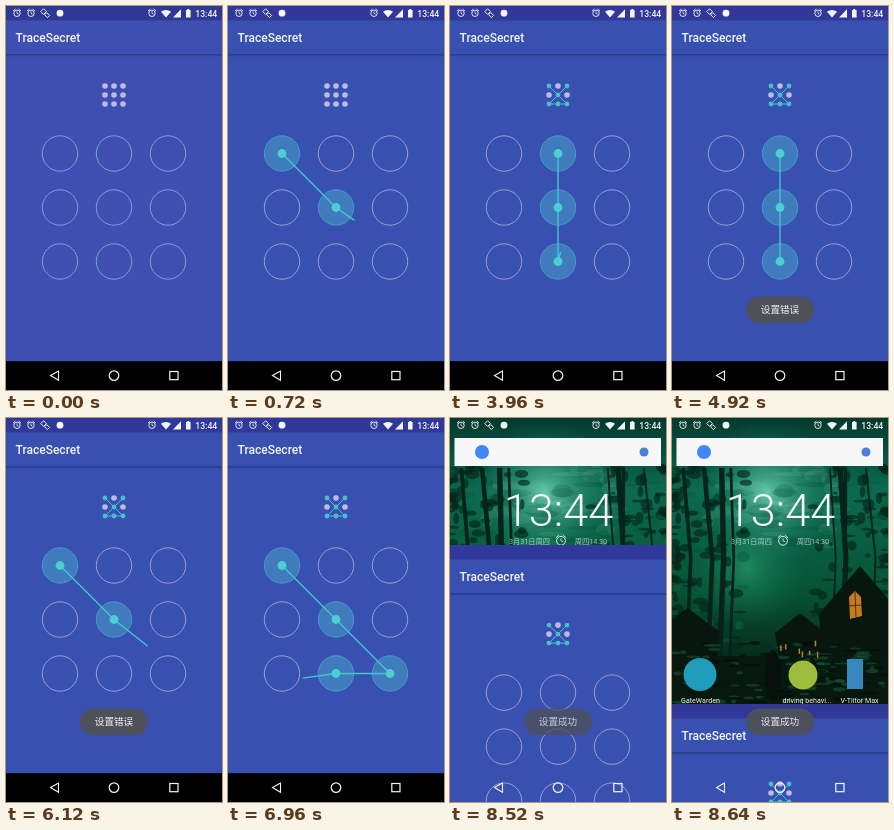
Animation of 216x384 px, one loop 8760 ms. Source, as an HTML page with a canvas:

```html
<!DOCTYPE html>
<html lang="zh">
<head>
<meta charset="utf-8">
<title>TraceSecret</title>
<style>
html, body { margin: 0; width: 100%; height: 100%; overflow: hidden; background: #3850b0; }
canvas { display: block; width: 100vw; height: 100vh; }
</style>
</head>
<body>
<canvas id="stage"></canvas>
<script>
const W = 216, H = 384, LOOP = 8760, STEP = 120;
const NAV_TOP = 355.2, NAV_MID = 369.6, LEAVE = 8280, APP_DROP = 286;
const canvas = document.getElementById('stage');
const ctx = canvas.getContext('2d');
const SANS = 'Roboto, "Noto Sans CJK SC", "Noto Sans CJK", sans-serif';
const TEAL = '#4ccfd3', WHITE = '#f4f4f8';
const SECRET = [0, 4, 8, 7, 6, 4, 2];

// The finger crosses one cell every "pace" ms; the drawing stays until "clear".
const strokes = [
  { route: SECRET, start: 194, pace: 408, clear: 3400 },
  { route: [1, 4, 7], start: 3478, pace: 264, clear: 5160 },
  { route: SECRET, start: 5485, pace: 408, clear: LEAVE }
];

const clamp = v => Math.max(0, Math.min(1, v));
const gridPoint = (i, x, y, gap) => [x + i % 3 * gap, y + Math.floor(i / 3) * gap];
const node = i => gridPoint(i, 54, 147.5, 54);
const mini = i => gridPoint(i, 99, 80, 9);

function seeded(seed) {
  return () => (seed = seed * 16807 % 2147483647) / 2147483647;
}

function disc(x, y, r, fill, stroke, width = 1) {
  ctx.beginPath();
  ctx.arc(x, y, r, 0, Math.PI * 2);
  if (fill) { ctx.fillStyle = fill; ctx.fill(); }
  if (stroke) { ctx.strokeStyle = stroke; ctx.lineWidth = width; ctx.stroke(); }
}

function oval(x, y, rx, ry, fill) {
  ctx.beginPath();
  ctx.ellipse(x, y, rx, ry, 0, 0, Math.PI * 2);
  ctx.fillStyle = fill;
  ctx.fill();
}

function rect(x, y, w, h, fill) {
  ctx.fillStyle = fill;
  ctx.fillRect(x, y, w, h);
}

function line(points, color, width) {
  ctx.beginPath();
  points.forEach(p => ctx.lineTo(...p));
  ctx.strokeStyle = color;
  ctx.lineWidth = width;
  ctx.stroke();
}

function poly(points, fill) {
  ctx.beginPath();
  points.forEach(p => ctx.lineTo(...p));
  ctx.fillStyle = fill;
  ctx.fill();
}

function text(str, x, y, font, align = 'left', fill = WHITE) {
  ctx.font = font + ' ' + SANS;
  ctx.textAlign = align;
  ctx.fillStyle = fill;
  ctx.fillText(str, x, y);
}

// Point on the route after "cells" cells, bowed a little to one side.
function fingerAt(route, cells) {
  const k = Math.floor(cells), u = cells - k;
  const [x0, y0] = node(route[k]), [x1, y1] = node(route[k + 1]);
  const dx = x1 - x0, dy = y1 - y0;
  const bow = 5 * Math.sin(Math.PI * u) / Math.hypot(dx, dy);
  return [x0 + dx * u + dy * bow, y0 + dy * u - dx * bow];
}

function alarm(x, y, r = 3.2) {
  disc(x, y + 0.3, r, null, WHITE, 0.9);
  line([[x, y - r / 2], [x, y + 0.4], [x + r / 2, y + 1.2]], WHITE, 0.8);
  for (const s of [-1, 1]) {
    line([[x + s * (r + 0.8), y - r * 0.6], [x + s * r / 2, y - r - 0.8]], WHITE, 0.9);
  }
}

function statusIcons() {
  [11, 25, 146].forEach(x => alarm(x, 7));
  ctx.save();
  ctx.translate(39, 7);
  ctx.rotate(Math.PI / 4);
  ctx.strokeStyle = WHITE;
  ctx.strokeRect(-4, -2, 4, 4);
  ctx.strokeRect(1, -1.5, 4, 3);
  ctx.restore();
  disc(54, 7.2, 3.4, WHITE);
  ctx.beginPath();
  ctx.moveTo(160, 11.5);
  ctx.arc(160, 11.5, 7.6, Math.PI * 1.27, Math.PI * 1.73);
  ctx.fillStyle = WHITE;
  ctx.fill();
  poly([[167, 11.5], [175, 3.2], [175, 11.5]], WHITE);
  rect(180, 4, 4.6, 7.5, WHITE);
  rect(181.3, 3, 2, 1, WHITE);
  text('13:44', 211.3, 10.6, '500 8.7px', 'right');
}

function navIcons() {
  line([[52.5, 365], [44.5, NAV_MID], [52.5, 374.2], [52.5, 364.5]], WHITE, 1.1);
  disc(108, NAV_MID, 4.8, null, WHITE, 1.2);
  ctx.strokeRect(163.8, NAV_MID - 4.1, 8.2, 8.2);
}

function indicator(done) {
  if (done) line(SECRET.map(mini), TEAL, 0.9);
  for (let i = 0; i < 9; i++) {
    const on = done && SECRET.includes(i);
    disc(...mini(i), on ? 2.4 : 2.8, on ? '#49bfca' : '#bdbbe4');
  }
}

function grid(t) {
  const stroke = strokes.find(s => t >= s.start && t < s.clear);
  const { route, start, pace } = stroke || { route: [], start: 0, pace: 1 };
  const cells = (t - start) / pace;
  const hits = route.filter((n, i) => cells >= i - 0.2);
  for (let i = 0; i < 9; i++) {
    const on = hits.includes(i);
    disc(...node(i), 17.7, on ? '#407bbd' : null,
      on ? '#4b9fc8' : t < STEP ? '#7babdd' : '#aaa2dc', 0.9);
  }
  const trail = hits.map(node);
  if (cells < route.length - 1) trail.push(fingerAt(route, cells));
  line(trail, '#42c6cf', 1.4);
  hits.forEach(i => disc(...node(i), 4.4, TEAL));
}

function app(t, shift) {
  ctx.save();
  ctx.translate(0, shift);
  rect(0, 0, W, H, t < STEP ? '#3f4fb1' : '#3850b0');
  rect(0, 0, W, 14.4, t < STEP ? '#2d3995' : '#30399a');
  const shade = ctx.createLinearGradient(0, 48, 0, 51);
  shade.addColorStop(0, 'rgba(20,30,80,.45)');
  shade.addColorStop(1, 'rgba(20,30,80,0)');
  rect(0, 48, W, 3, shade);
  text('TraceSecret', 9.5, 35.8, '500 12px');
  indicator(t >= 3000);
  grid(t);
  ctx.restore();
}

function glow(x, y, r, color) {
  const g = ctx.createRadialGradient(x, y, 0, x, y, r);
  g.addColorStop(0, color);
  g.addColorStop(1, 'rgba(10,110,80,0)');
  rect(0, 0, W, H, g);
}

function house(x, y, w, h) {
  poly([[x - 5, y + h * 0.4], [x + w / 2, y], [x + w + 5, y + h * 0.4],
    [x + w, y + h], [x, y + h]], '#07160f');
}

function wallpaper() {
  const rnd = seeded(31);
  const sky = ctx.createLinearGradient(0, 0, 0, 290);
  sky.addColorStop(0, '#04392f');
  sky.addColorStop(0.25, '#0b6a50');
  sky.addColorStop(0.6, '#075236');
  sky.addColorStop(0.85, '#06271a');
  rect(0, 0, W, H, sky);
  glow(95, 75, 75, 'rgba(110,215,180,.85)');
  glow(75, 150, 60, 'rgba(40,155,110,.7)');
  // drifting cloud wisps
  for (let i = 0; i < 40; i++) {
    oval(30 + rnd() * 140, 45 + rnd() * 90, 6 + rnd() * 16, 2 + rnd() * 6,
      i % 2 ? 'rgba(130,220,190,.13)' : 'rgba(4,70,52,.2)');
  }
  // leaves crowd towards both edges and thin out over the middle
  for (let i = 0; i < 260; i++) {
    const inset = 75 * rnd() ** 2, y = 50 + rnd() * 180;
    oval(i % 2 ? inset : W - inset, y, 2 + rnd() * 6, 1 + rnd() * 5,
      rnd() < 0.7 ? 'rgba(3,38,25,.65)' : 'rgba(10,92,55,.5)');
  }
  for (let i = 0; i < 8; i++) {
    const x = i % 2 ? rnd() * 60 : 150 + rnd() * 66;
    line([[x, 240], [x + 4, 140], [x + rnd() * 12 - 6, 50]], '#04231a', 1.5 + rnd() * 4);
  }
  house(-12, 190, 55, 60);
  house(108, 195, 40, 50);
  house(152, 148, 72, 120);
  rect(0, 238, W, 62, '#07190f');
  for (let i = 0; i < 140; i++) {
    oval(rnd() * W, 225 + rnd() * 60, 2 + rnd() * 8, 0.6 + rnd() * 1.6,
      rnd() < 0.5 ? 'rgba(2,14,9,.7)' : 'rgba(28,100,62,.45)');
  }
  for (let i = 0; i < 7; i++) {
    rect(105 + rnd() * 40, 220 + rnd() * 14, 1.5, 3 + rnd() * 3, '#b8842c');
  }
  poly([[177, 179], [183, 173], [189, 179], [190, 198], [178, 201]], '#c87a20');
  line([[183, 173], [184, 200]], '#4c3014', 1);
  line([[177, 188], [190, 187]], '#4c3014', 1);
  oval(101, 258, 8, 26, '#06100c');
}

function shortcut(x, label) {
  text(label, x, 285, '400 7.1px', 'center');
}

function launcher() {
  wallpaper();
  rect(4.5, 20, 206.5, 28, '#f6f7f6');
  disc(32, 34, 7, '#4285f4');
  disc(194, 34, 4.5, '#4a80d8');
  text('13:44', 108.5, 108, '300 45px', 'center');
  const dim = 'rgba(235,245,240,.7)';
  text('3月31日周四', 59, 125.5, '400 7.2px', 'left', dim);
  alarm(111, 122.5, 4.4);
  text('周四14:30', 157, 125.5, '400 7.2px', 'right', dim);
  disc(28, 256.5, 16.5, '#1f9dbb');
  disc(131, 257, 14.5, '#9fbd3d');
  rect(175, 241, 16, 30, '#3587bd');
  shortcut(28.5, 'GateWarden');
  shortcut(135, 'driving behavi...');
  shortcut(187.5, 'V-Tiltor Max');
}

function toast(str, alpha) {
  ctx.save();
  ctx.globalAlpha = alpha;
  ctx.beginPath();
  ctx.roundRect(74, 290.5, 68, 26.5, 13.2);
  ctx.fillStyle = '#4e5159';
  ctx.fill();
  text(str, 108, 307.4, '400 9.6px', 'center');
  ctx.restore();
}

function draw(t) {
  const leaving = clamp((t - LEAVE) / 360);
  const shift = APP_DROP * leaving ** 2;
  if (shift) launcher();
  app(t, shift);
  if (!shift) rect(0, NAV_TOP, W, H - NAV_TOP, '#000');
  statusIcons();
  navIcons();
  toast('设置错误', Math.min(clamp((t - 4440) / 240), clamp((6480 - t) / 300)));
  toast('设置成功', 0.95 * clamp((t - LEAVE) / 300));
}

function frame(now) {
  const dpr = window.devicePixelRatio || 1;
  const w = Math.round(innerWidth * dpr), h = Math.round(innerHeight * dpr);
  if (canvas.width !== w || canvas.height !== h) {
    canvas.width = w;
    canvas.height = h;
  }
  ctx.setTransform(w / W, 0, 0, h / H, 0, 0);
  const elapsed = Math.max(0, now - start) % LOOP;
  draw(Math.floor(elapsed / STEP) * STEP);
  requestAnimationFrame(frame);
}

const start = performance.now();
frame(start);
</script>
</body>
</html>
```
